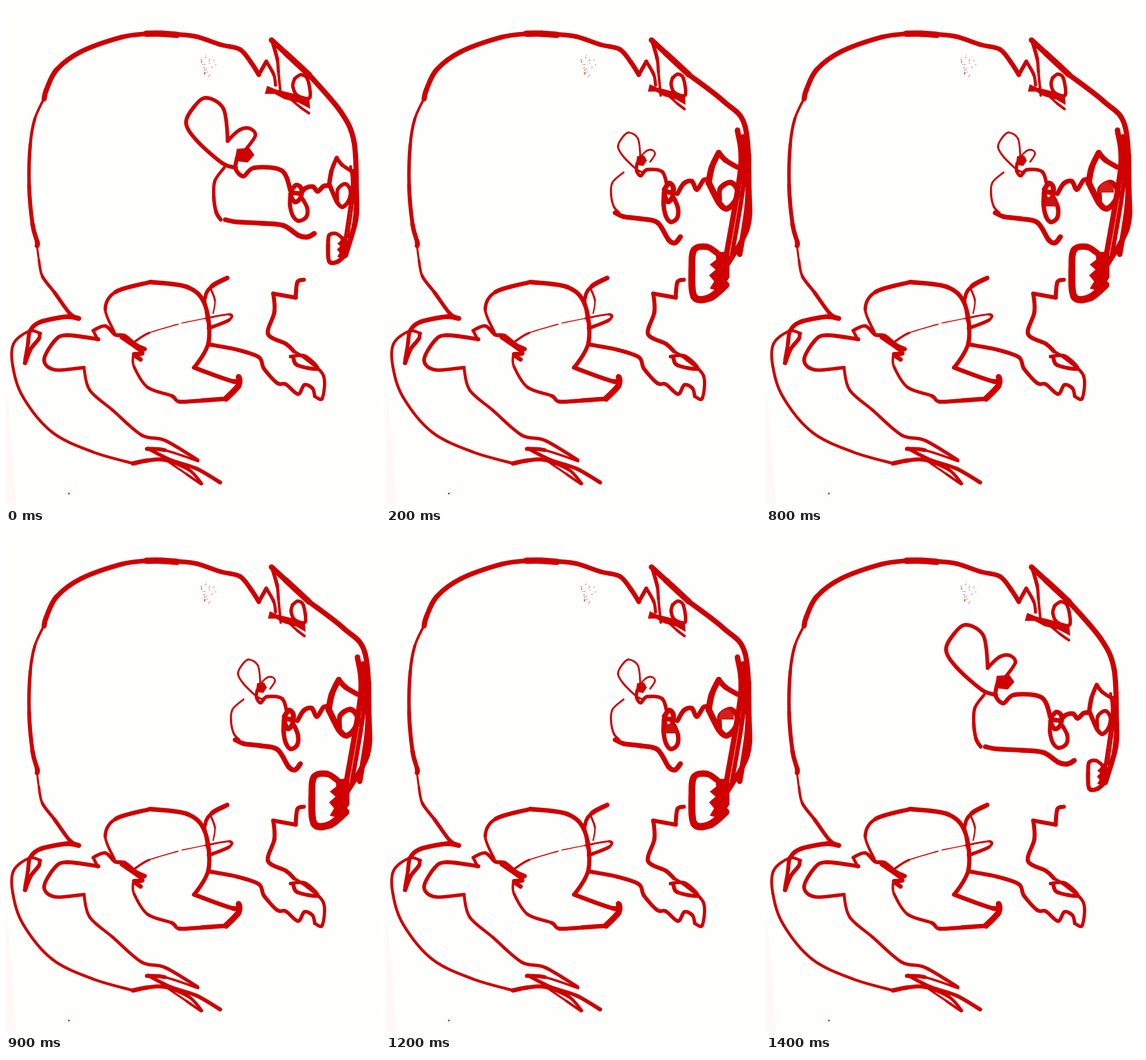
These frames come from a looping animation (648 by 864 pixels, 1.8 s). An HTML page with a canvas:

```html
<!DOCTYPE html>
<html lang="en">
<head>
<meta charset="utf-8">
<title>Ink creature</title>
<style>
  html, body { margin: 0; height: 100%; overflow: hidden; background: #fefffd; }
  canvas { display: block; }
</style>
</head>
<body>
<canvas id="stage" width="648" height="864"></canvas>
<script>
const ctx = document.getElementById('stage').getContext('2d');
const RED = '#cf0000', PAPER = '#fefffd';
ctx.lineCap = ctx.lineJoin = 'round';

// Coordinates are percentages of the current box; the default box is plain pixels.
const PIXELS = [0, 0, 100, 100, 1];
let box = PIXELS;

// "x,y x,y*": the star marks a sharp corner.
function parse(text) {
  const [left, top, width, height] = box;
  return text.trim().split(/\s+/).map(item => {
    const [x, y] = item.split(',').map(parseFloat);
    return { x: left + x * width / 100, y: top + y * height / 100, sharp: item.endsWith('*') };
  });
}

// Smooth brush stroke whose width runs from one value to another.
function ink(from, to, text) {
  const pts = parse(text), last = pts.length - 1, weight = box[4] ?? 1;
  const slope = (i, k) => pts[i].sharp ? 0 :
    (pts[Math.min(i + 1, last)][k] - pts[Math.max(i - 1, 0)][k]) / 6;
  ctx.strokeStyle = RED;
  for (let i = 0; i < last; i++) {
    const a = pts[i], b = pts[i + 1];
    ctx.lineWidth = weight * (from + (to - from) * (i + .5) / last);
    ctx.beginPath();
    ctx.moveTo(a.x, a.y);
    ctx.bezierCurveTo(a.x + slope(i, 'x'), a.y + slope(i, 'y'),
      b.x - slope(i + 1, 'x'), b.y - slope(i + 1, 'y'), b.x, b.y);
    ctx.stroke();
  }
}

function blob(text, color = RED) {
  ctx.fillStyle = color;
  ctx.beginPath();
  for (const p of parse(text)) ctx.lineTo(p.x, p.y);
  ctx.fill();
}

function oval(x, y, rx, ry, color = RED, from = 0) {
  ctx.fillStyle = color;
  ctx.beginPath();
  ctx.ellipse(x, y, rx, ry, 0, from, 2 * Math.PI);
  ctx.fill();
}

function specks() {
  let seed = 7;
  const random = () => (seed = seed * 16807 % 2147483647) / 2147483647;
  for (let i = 0; i < 22; i++) {
    const angle = random() * 6.28, r = Math.sqrt(random());
    oval(350 + 14 * r * Math.cos(angle), 102 + 21 * r * Math.sin(angle), .5 + random() * .6, .7);
  }
  oval(109, 844, 1.4, 1.6);
}

function back() {
  ink(8, 3, '126,541 111,533 84,496 63,468 57,440 54,418');
  ink(9, 4, '54,415 54,408 46,378 40,310 42,240 50,195 66,160');
  ink(9, 8, '66,161 70,145 88,110 130,79 200,54 243,48');
  ink(11, 11, '243,48 270,48 296,50');
  ink(8, 8, '296,49 330,53 372,67 405,75 424,97 438,119*');
  ink(7, 5, '438,119* 451,96* 464,119 467,137');
  ink(9, 11, '460,59 485,82 525,119');
  ink(7, 4, '461,60 470,92 472,114 476,155');
}

function tail() {
  ink(9, 6, '126,541 105,538 60,547 42,562 38,585 33,613');
  ink(5, 5, '60,567 40,563 13,585 12,625 30,678 80,738 150,772 220,792');
  ink(8, 5, '220,792 245,787 275,786 317,803 339,827');
  ink(6, 8, '58,567 57,576 42,595 33,618');
  ink(7, 6, '160,577 105,570 84,580 66,613 85,630 135,626');
  ink(5, 6, '135,626 145,665 185,700 235,743 275,752 332,786');
  ink(8, 3, '244,767 275,769 333,788');
  ink(6, 7, '246,766 285,786 330,801 371,825');
  ink(3, 5, '278,787 312,810 338,828');
}

function hindLeg() {
  ink(5, 8, '159,578 151,562* 172,554 189,569 205,571 225,587 240,594');
  ink(6, 8, '200,574 236,600 222,603 233,612');
  ink(4, 8, '188,565 172,525 190,495 250,478');
  ink(8, 7, '250,478 315,487 345,518 351,582 326,626*');
  ink(7, 11, '326,626* 394,650 403,642 403,657 381,680');
  ink(8, 4, '381,680 340,683 300,685 287,675 245,660 222,625 220,607');
  ink(5, 1, '222,582 248,566 298,551');
  ink(1, 7, '305,549 345,541 387,534 386,544 351,558');
  ink(9, 4, '383,471 357,485 345,505 349,545');
  ink(4, 2, '354,488 362,510 359,532');
}

function frontLeg() {
  ink(7, 6, '352,586 400,595 438,608 447,628 470,653 485,655 506,672 517,656 531,662 535,676');
  ink(6, 5, '535,676 548,679 550,640 522,613 499,598');
  ink(7, 7, '499,598 485,585 454,568 465,530 463,498* 502,505* 505,478 516,474');
  ink(6, 7, '493,607 517,606 540,628 505,622 498,610');
}

const parts = {
  ear() {
    ink(6, 6, '65,11 79,0 94,12 99,62 71,56 61,31 65,11');
    blob('3,30 23,40 52,48 98,62 100,92 75,76 42,66 20,52 -2,52');
    ink(4, 5, '58,68 78,88 97,104');
  },
  flower() {
    ink(7, 6, '72,89 52,83 15,54 0,32 11,12 29,0 54,14 60,55* 77,41 92,39 100,48 87,65');
  },
  chain() {
    blob('2,-4 25,-6 34,11 22,30 -2,26');
    ink(7, 8, '2,20 0,46 14,64 34,43 84,50 100,100');
  },
  cheek() {
    ink(5, 7, '90,0 10,25 0,55 20,85 60,100');
  },
  jaw() {
    ink(8, 9, '0,0 13,13 39,20 65,33 82,90 92,100 100,80');
  },
  nearEye() {
    ink(8, 8, '5,16 37,0 67,11 60,37 27,47 5,24 60,24');
    ink(7, 7, '3,24 0,56 17,86 50,100 93,90 100,65 73,39');
  },
  bridge() {
    ink(8, 8, '0,100 20,29 45,14 61,71 82,7 100,0');
  },
  farEye() {
    ink(8, 6, '0,54 11,26 35,0* 60,14 100,26');
    ink(8, 6, '0,53 16,70 38,91 62,100 90,88 100,67 75,53 40,64 38,85');
  },
  snout() {
    ink(5, 5, '50,0 65,30 0,100');
    ink(4, 4, '75,5 80,40 25,100');
    ink(5, 5, '100,20 95,60 60,100');
  },
  mouth() {
    ink(6, 8, '70,12 42,0 6,6 0,43 6,98 50,100 94,75');
    blob('66,10 105,10 105,60 80,88 50,82 62,68 48,56 66,45 50,35 68,25');
  }
};

// Each part gets x, y, width, height and an optional line weight.
const poses = [
  {
    profile: '525,119 580,183 603,235 607,320 606,370 588,432',
    ear: [450, 119, 77, 64], flower: [312, 159, 120, 136], chain: [398, 250, 95, 70],
    cheek: [360, 280, 20, 90], jaw: [380, 370, 154, 30], nearEye: [492, 310, 30, 62],
    bridge: [510, 311, 49, 14], farEye: [560, 263, 37, 85], snout: [588, 278, 18, 122],
    mouth: [558, 394, 32, 49]
  },
  {
    profile: '525,119 585,173 608,220 620,290 627,375 605,455',
    ear: [449, 119, 73, 58], flower: [349, 190, 86, 108, .8], chain: [408, 255, 81, 64, .9],
    cheek: [378, 288, 14, 85, .8], jaw: [391, 373, 147, 34], nearEye: [489, 305, 33, 67],
    bridge: [510, 300, 50, 25], farEye: [560, 244, 47, 95], snout: [603, 200, 20, 205, 1.2],
    mouth: [566, 402, 42, 64]
  },
  {
    profile: '525,119 585,165 622,208 629,320 626,385 590,450',
    ear: [455, 118, 64, 58], flower: [402, 219, 64, 78, .5], chain: [434, 262, 53, 50, .8],
    cheek: [390, 288, 24, 70, .6], jaw: [397, 358, 113, 52], nearEye: [481, 307, 25, 67, 1.1],
    bridge: [505, 300, 55, 25], farEye: [559, 254, 50, 97, 1.4], snout: [590, 215, 38, 215, 1.9],
    mouth: [530, 417, 62, 88, 1.7]
  }
];

function face({ profile, ...places }) {
  ink(9, 9, profile);
  for (const name in places) {
    box = places[name];
    parts[name]();
  }
  box = PIXELS;
}

// lid: 0 open, 1 half, 2 shut
function lids(lid) {
  if (!lid) return;
  const from = lid === 1 ? Math.PI : 0;
  oval(493, 347, 11, 17, '#c9120d', from);
  oval(590, 323, 13, 18, '#d2201a', from);
}

function draw(now) {
  const step = Math.floor(now % 1800 / 100);
  const pose = step < 2 ? step : Math.min(2, Math.max(0, 14 - step));
  const lid = step > 5 && step < 13 ? [1, 2, 1, 0][(step - 6) % 4] : 0;
  ctx.fillStyle = PAPER;
  ctx.fillRect(0, 0, 648, 864);
  blob('0,655 8,740 18,864 0,864', '#fff8f7');
  specks();
  back();
  tail();
  hindLeg();
  frontLeg();
  face(poses[pose]);
  lids(lid);
}

const start = performance.now();
function tick() {
  draw(performance.now() - start);
  requestAnimationFrame(tick);
}
tick();
</script>
</body>
</html>
```
